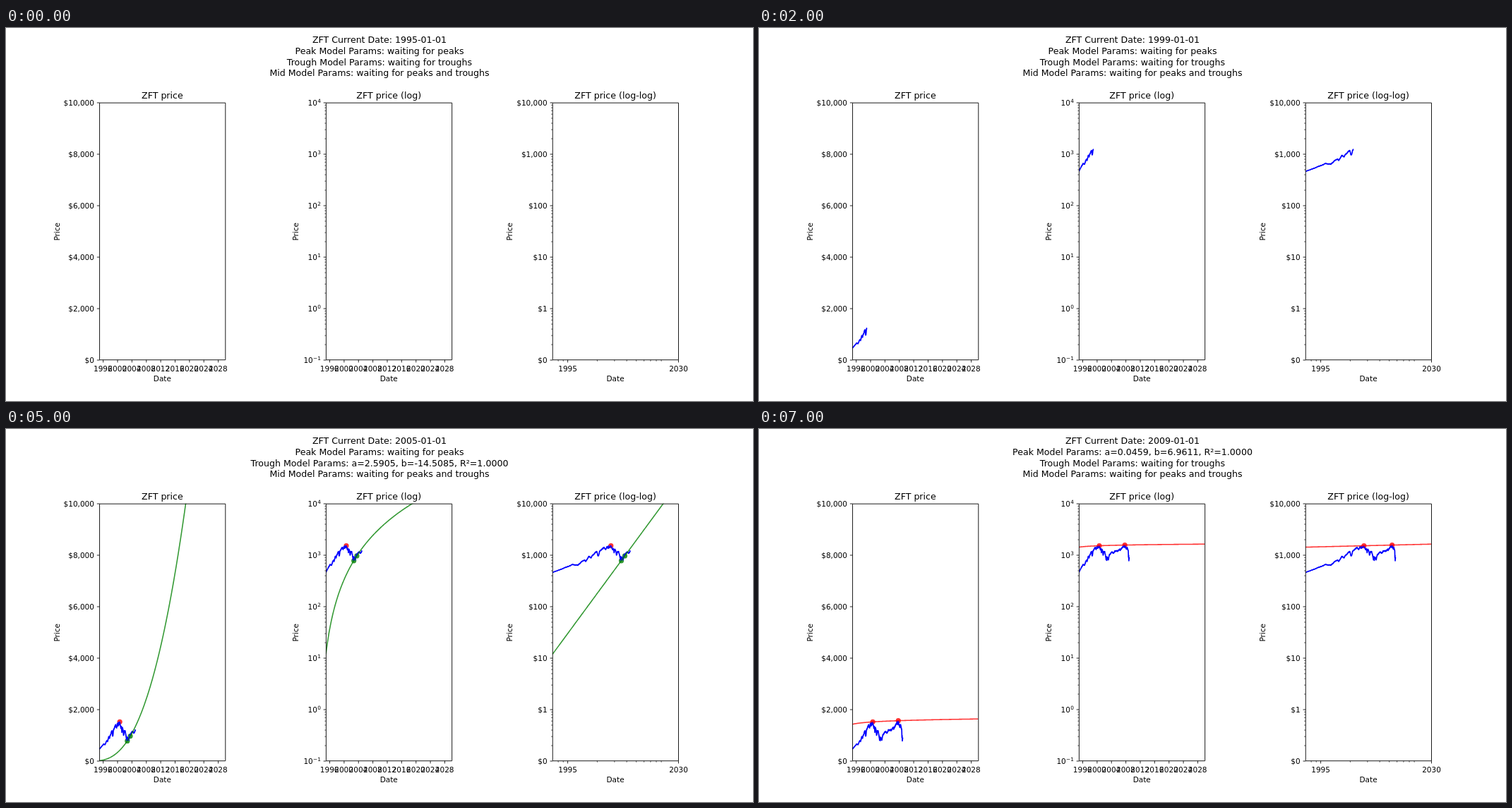
An HTML page with a canvas for the animation above (8000 ms loop, 1058 by 529 pixels).

```html
<!DOCTYPE html>
<html lang="en">
<head>
<meta charset="utf-8">
<title>ZFT price models</title>
<style>
html, body { margin: 0; width: 100%; height: 100%; overflow: hidden; background: #fff; }
canvas { display: block; }
</style>
</head>
<body>
<canvas id="stage" width="1058" height="529"></canvas>
<script>
const ctx = document.getElementById('stage').getContext('2d');
const TOP = 105.8, BOTTOM = 470.8, WIDTH = 178.25, DECADE = 73;
const RED = 'rgba(255,0,0,.8)', GREEN = 'rgba(0,128,0,.8)';
const FONT = '"DejaVu Sans", sans-serif';

// Main turning points of the price: years since 1995, value
const knots = [
  [0, 459], [1.15, 650], [1.55, 635], [2.13, 808], [2.28, 745], [2.6, 945],
  [2.82, 890], [3.3, 1115], [3.54, 1175], [3.66, 975], [3.77, 980], [3.9, 1185],
  [4.54, 1405], [4.79, 1265], [5, 1455], [5.15, 1345], [5.23, 1510], [5.29, 1380],
  [5.67, 1510], [5.97, 1280], [6.08, 1360], [6.26, 1120], [6.39, 1295], [6.6, 1185],
  [6.72, 980], [6.95, 1155], [7.2, 1155], [7.56, 812], [7.64, 945], [7.77, 790],
  [7.91, 925], [8.2, 815], [8.45, 1000], [9.1, 1145], [9.62, 1072], [10, 1208],
  [10.8, 1190], [11.35, 1315], [11.45, 1235], [12.54, 1540], [12.62, 1425],
  [12.77, 1555], [13.2, 1285], [13.38, 1415], [13.73, 1200], [13.78, 905],
  [13.84, 990], [13.89, 770], [14, 900]
];

const days = year => 702 + (year - 1995) * 365.25;
const linX = year => (year - 1995) / 35 * WIDTH;
const logX = year => Math.log10(days(year) / 702) * 138.87;
const linY = p => BOTTOM - p * .0365;
const logY = p => TOP + DECADE * (4 - Math.log10(p));
const panels = [
  { left: 132.25, x: linX, y: linY, title: 'ZFT price', labelX: 75.6 },
  { left: 453.1, x: linX, y: logY, title: 'ZFT price (log)', labelX: 414 },
  { left: 773.95, x: logX, y: logY, title: 'ZFT price (log-log)', labelX: 717 }
];

const peaks = [[2000.67, 1520], [2007.77, 1565]];
const troughs = [[2002.77, 777], [2003.6, 966], [2004.62, 1064], [2005.79, 1177]];
const states = Array.from({ length: 8 }, (_, i) => ({ year: 1995 + 2 * i, peaks: [], troughs: [] }));
for (let i = 4; i < 8; i++) states[i].peaks = peaks.slice(0, i < 7 ? 1 : 2);
Object.assign(states[5], { troughs: troughs.slice(0, 2), low: [2.5905, -14.5085, '1.0000'] });
Object.assign(states[6], { troughs, low: [1.4538, -5.1772, '0.9422'] });
states[7].high = [.0459, 6.9611, '1.0000'];

// Daily prices: straight runs between turning points plus seeded jitter
let seed = 7, drift = 0;
const random = () => (seed = seed * 16807 % 2147483647) / 2147483647;
const prices = [];
for (let day = 0, k = 0; day <= 3500; day++) {
  const t = day / 250;
  while (k < knots.length - 2 && t > knots[k + 1][0]) k++;
  const [t0, p0] = knots[k], [t1, p1] = knots[k + 1];
  drift = drift * .9 + random() - .5;
  const jitter = drift * Math.min(.014, .004 + t * .004);
  prices.push([1995 + t, (p0 + (p1 - p0) * (t - t0) / (t1 - t0)) * (1 + jitter)]);
}

function text(str, x, y, size = 10.5, align = 'center') {
  ctx.font = `${size}px ${FONT}`;
  ctx.textAlign = align;
  ctx.fillStyle = '#000';
  ctx.fillText(str, x, y);
}

function stroke(points, color, width) {
  ctx.beginPath();
  for (const [x, y] of points) ctx.lineTo(x, y);
  ctx.strokeStyle = color;
  ctx.lineWidth = width;
  ctx.stroke();
}

const tickX = (x, size = 3.7, w = .85) => stroke([[x, 470.7], [x, 470.7 + size]], '#000', w);
const tickY = (x, y, size = 3.7, w = .85) => stroke([[x, y], [x - size, y]], '#000', w);

function power(exp, right, y) {
  const sup = exp < 0 ? '\u2212' + -exp : '' + exp;
  text(sup, right, y - 4, 7.35, 'right');
  text('10', right - ctx.measureText(sup).width - .2, y, 10.5, 'right');
}

function drawAxes({ left, x, title, labelX }, n) {
  const edge = left + .3, labelEnd = left - 7.3;
  ctx.strokeStyle = '#000';
  ctx.lineWidth = .9;
  ctx.strokeRect(edge, 106.2, WIDTH, 364.5);
  text(title, left + WIDTH / 2, 99.6, 12.6);
  text('Date', left + WIDTH / 2, 501);

  ctx.save();
  ctx.translate(labelX, 288.8);
  ctx.rotate(-Math.PI / 2);
  text('Price', 0, 0);
  ctx.restore();

  if (n < 2) {
    for (let year = 1996; year <= 2028; year += 4) {
      tickX(edge + x(year));
      text(year, left + x(year), 486.8);
    }
  } else {
    const at = d => edge + Math.log10(d / 702) * 138.87;
    for (const d of [800, 900]) tickX(at(d), 2.1, .65);
    for (let d = 2000; d < 10000; d += 1000) tickX(at(d), 2.1, .65);
    for (const [d, label] of [[1000, '1995'], [13486, '2030']]) {
      tickX(at(d));
      text(label, at(d), 486.8);
    }
  }

  for (let i = 0; i <= 5; i++) {
    const y = BOTTOM - i * DECADE;
    tickY(edge, y + .2);
    if (n === 1) power(i - 1, labelEnd, y + 4.6);
    else {
      const value = n ? (i && 10 ** (i - 1)) : i * 2000;
      text('$' + value.toLocaleString('en-US'), labelEnd, y + 3.9, 10.5, 'right');
    }
    if (n && i < 5)
      for (let m = 2; m < 10; m++) tickY(edge, y - DECADE * Math.log10(m) + .2, 2.1, .65);
  }
}

function drawData({ left, x, y }, state) {
  const place = ([year, p]) => [left + x(year), y(p)];
  const dots = (list, color) => {
    for (const item of list) {
      ctx.beginPath();
      ctx.arc(...place(item), 3.6, 0, 7);
      ctx.fillStyle = color;
      ctx.fill();
    }
  };
  const curve = (fit, color) => {
    if (!fit) return;
    const line = [];
    for (let i = 0; i <= 350; i++) {
      const year = 1995 + i / 10;
      line.push(place([year, Math.exp(fit[0] * Math.log(days(year)) + fit[1])]));
    }
    stroke(line, color, 1.57);
  };
  ctx.save();
  ctx.beginPath();
  ctx.rect(left, TOP, WIDTH, BOTTOM - TOP);
  ctx.clip();
  dots(state.peaks, RED);
  dots(state.troughs, GREEN);
  if (state.year > 1995)
    stroke(prices.filter(p => p[0] <= state.year).map(place), '#00f', 1.7);
  curve(state.high, RED);
  curve(state.low, GREEN);
  ctx.restore();
}

function draw(state) {
  ctx.fillStyle = '#fff';
  ctx.fillRect(0, 0, 1058, 529);
  ctx.lineJoin = 'round';
  const params = (fit, wait) => fit
    ? `a=${fit[0].toFixed(4)}, b=${fit[1].toFixed(4)}, R²=${fit[2]}` : `waiting for ${wait}`;
  [
    `ZFT Current Date: ${state.year}-01-01`,
    `Peak Model Params: ${params(state.high, 'peaks')}`,
    `Trough Model Params: ${params(state.low, 'troughs')}`,
    'Mid Model Params: waiting for peaks and troughs'
  ].forEach((line, i) => text(line, 529, 21.1 + i * 15.7, 12.6));
  panels.forEach((panel, n) => {
    drawData(panel, state);
    drawAxes(panel, n);
  });
}

const start = performance.now();
let shown = -1;
function frame() {
  const step = Math.floor((performance.now() - start) % 8000 / 1000);
  if (step !== shown) draw(states[shown = step]);
  requestAnimationFrame(frame);
}
frame();
</script>
</body>
</html>
```
